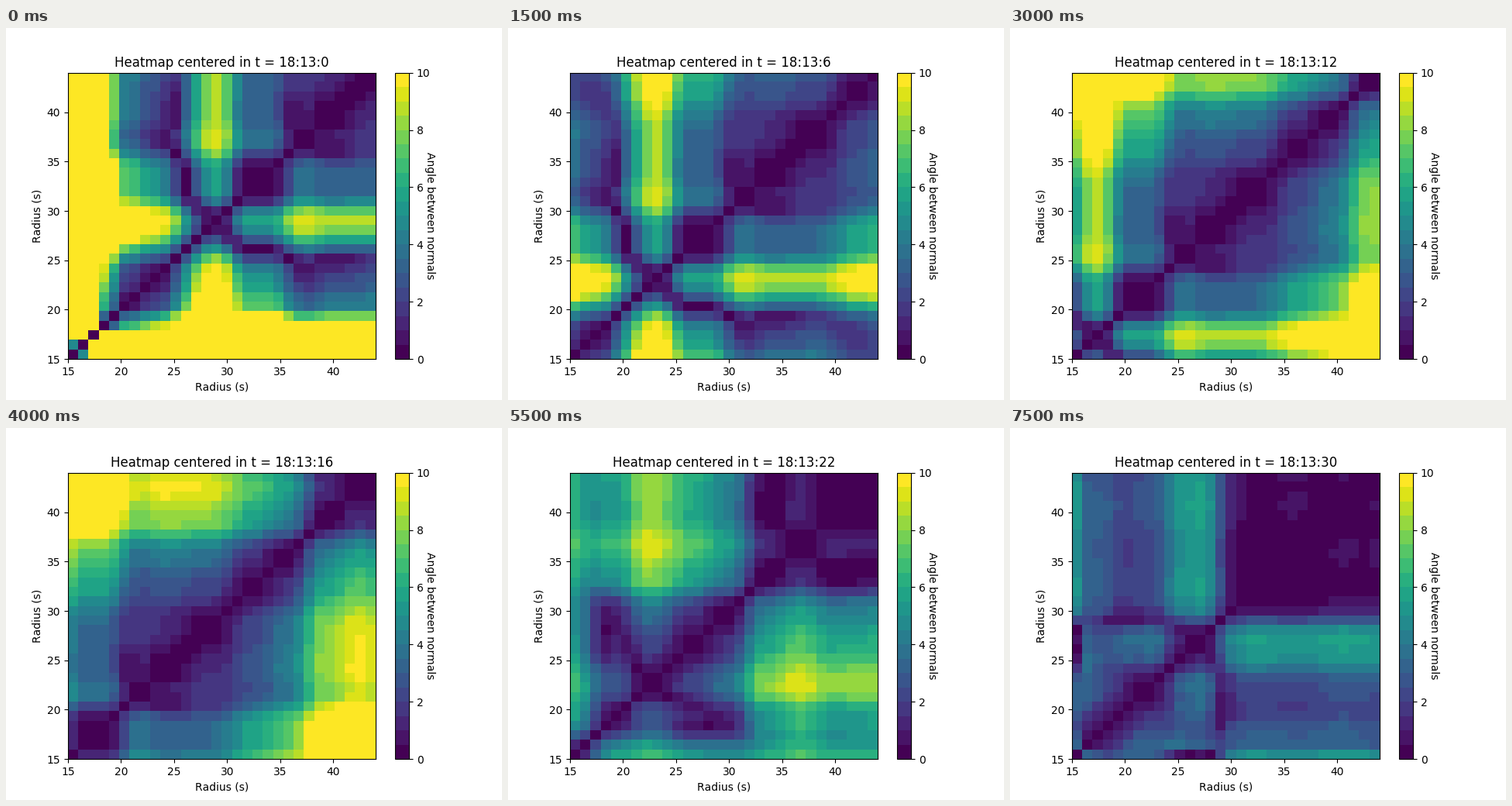
Recreate the animation shown at these times as a matplotlib script. Size 640x480 px, loop 8 s.

```python
import numpy as np
import matplotlib.pyplot as plt
from matplotlib.animation import FuncAnimation

FRAMES, INTERVAL = 16, 500
STEP = 2            # seconds of data per frame
R_MIN, N = 15, 30   # smallest radius, number of radii

# Key points of the normal's tilt in degrees: time -> x + y*1j.
# The leading edge of the window is at t + r, the trailing edge at t - r.
LEAD = {
    15: 49 - 4j, 16: 44 - 4j, 18: 3 - 4j, 20: -3.4 - 3.2j, 23: -5.5 - 3.7j,
    29: -16.3 - 4j, 32: -10.7 - 4.2j, 34: -10.7 - 4.2j, 37.5: -6.7 - 4j,
    40: -7.7 - 3.6j, 44.5: -7.8 - 2.2j, 48.5: -5.6 - 1.8j, 52: -4.1 - 1.2j,
    55.5: -0.1 - 0.1j, 59: 1.2 + 0.6j, 62: 0, 66.5: 0.25 + 0.1j,
    71: -0.3 - 0.1j, 74: -0.2 + 0.4j,
}
TRAIL = {0: 0, 3: 2.8 + 3.4j, 8: 5.7 - 0.3j, 14: 6 + 1.8j, 15: 9.8 + 2j}
DRIFT = 0.025 + 0.0625j   # slow turn of the trailing part


def ease(keys, s):
    """Smoothstep from key to key."""
    order = np.arange(len(keys))
    pos = np.interp(s, list(keys), order)
    f = pos % 1
    pos = pos - f + f * f * (3 - 2 * f)
    return np.interp(pos, order, np.array(list(keys.values()), complex))


def heatmap(t):
    r = R_MIN + np.arange(N)
    u = np.maximum(t - r, 0)
    tilt = ease(LEAD, t + r) + ease(TRAIL, u) - DRIFT * u * (26 - t)
    return np.abs(tilt[:, None] - tilt)


plt.rcParams["text.kerning_factor"] = 6
fig, ax = plt.subplots(figsize=(6.4, 4.8), dpi=100)
im = ax.imshow(heatmap(0), cmap=plt.get_cmap("viridis", 20), vmin=0, vmax=10,
               origin="lower", extent=(15, 44, 15, 44), aspect="auto",
               interpolation="nearest")
ticks = range(15, 41, 5)
ax.set(xlabel="Radius (s)", ylabel="Radius (s)", xticks=ticks, yticks=ticks)
title = ax.set_title("", pad=5.5)
fig.colorbar(im, ax=ax, ticks=range(0, 11, 2))
fig.text(547 / 640, 1 - 242.5 / 480, "Angle between normals", rotation=270,
         ha="center", va="center")


def update(i):
    t = STEP * i
    im.set_data(heatmap(t))
    title.set_text(f"Heatmap centered in t = 18:13:{t}")
    return im, title


anim = FuncAnimation(fig, update, frames=FRAMES, interval=INTERVAL,
                     repeat=True, repeat_delay=0)
plt.show()
```
